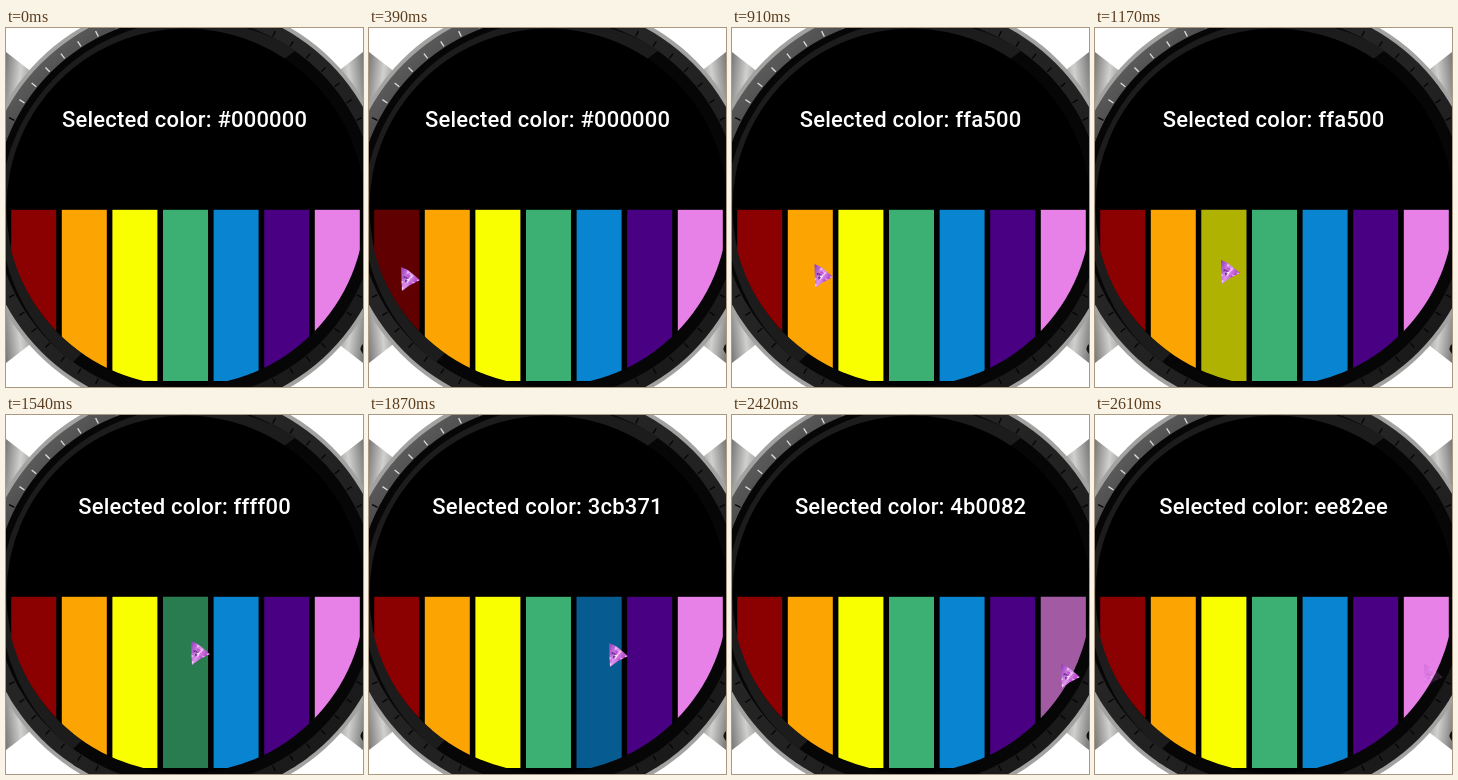
These frames come from a looping animation (357x359 px, 2.68 s). An HTML page:

```html
<!DOCTYPE html>
<html lang="en">
<head>
<meta charset="utf-8">
<title>Watch color picker</title>
<style>
  html, body { margin: 0; width: 100%; height: 100%; overflow: hidden; background: #fff; }
  svg { display: block; width: 357px; height: 359px; }
  #label {
    font: 500 22px Roboto, sans-serif; font-kerning: none; letter-spacing: .19px;
    fill: #fff; text-anchor: middle;
  }
</style>
</head>
<body>
<svg viewBox="0 0 357 359">
  <defs>
    <clipPath id="screen"><circle cx="179.5" cy="178.2" r="179.8"/></clipPath>
    <clipPath id="outline"><path d="M0 0L7 3L19 13L9 18L1 24Z"/></clipPath>
    <linearGradient id="steel" x2="1" y2=".3">
      <stop offset="0" stop-color="#777"/>
      <stop offset=".5" stop-color="#d0d0ce"/>
      <stop offset="1" stop-color="#8c8c8a"/>
    </linearGradient>
    <linearGradient id="bezel" x2="1" y2="1">
      <stop offset=".1" stop-color="#666"/>
      <stop offset=".35" stop-color="#262626"/>
      <stop offset="1" stop-color="#161616"/>
    </linearGradient>
    <linearGradient id="gem" x2="1" y2=".6">
      <stop offset="0" stop-color="#8e35b8"/>
      <stop offset=".5" stop-color="#dc92ea"/>
      <stop offset="1" stop-color="#a428b8"/>
    </linearGradient>
    <path id="lug" d="M0 24L31 48L12 80L0 98Z" fill="url(#steel)"/>
  </defs>

  <use href="#lug"/>
  <use href="#lug" transform="translate(357) scale(-1 1)"/>
  <use href="#lug" transform="translate(0 359) scale(1 -1)"/>
  <use href="#lug" transform="translate(357 359) scale(-1)"/>
  <g transform="translate(179.5 179.5)">
    <circle r="208" fill="#a2a2a0"/>
    <circle r="204" fill="url(#bezel)"/>
    <g id="ticks" stroke-width="1.3"></g>
    <circle r="191" fill="#060606"/>
    <path d="M-113 155A192 192 0 0 1 110 -157L98 -148A178 178 0 0 0 -103 145Z" fill="#1c1c1c"/>
    <circle r="179"/>
  </g>
  <path d="M357 316q-5 4 0 10Z" fill="#111"/>

  <g id="bars" clip-path="url(#screen)"></g>
  <text id="label" x="178.6" y="98.8"></text>
  <g id="cursor" clip-path="url(#outline)"><rect width="19" height="24" fill="url(#gem)"/></g>
</svg>

<script>
const LOOP = 2680, ENTER = 70, LEAVE = 2610, HOLD = 65;
const byId = id => document.getElementById(id);
const clamp = v => Math.min(1, Math.max(0, v));

function add(parent, tag, attrs) {
  const node = document.createElementNS('http://www.w3.org/2000/svg', tag);
  for (const name in attrs) node.setAttribute(name, attrs[name]);
  return byId(parent).appendChild(node);
}

let seed = 7;
const random = () => (seed = seed * 16807 % 2147483647) / 2147483647;

// each swatch is pressed at a moment and a point
const swatches = [
  { fill: '#8b0000', code: '8b0000', press: 390, x: 32, y: 239 },
  { fill: '#fca502', code: 'ffa500', press: 840, x: 81, y: 236 },
  { fill: '#faff00', code: 'ffff00', press: 1170, x: 126, y: 232 },
  { fill: '#3bb072', code: '3cb371', press: 1540, x: 185, y: 226 },
  { fill: '#0884d0', code: '884d0', press: 1870, x: 240, y: 228 },
  { fill: '#4a0082', code: '4b0082', press: 2100, x: 277, y: 227 },
  { fill: '#e780e7', code: 'ee82ee', press: 2420, x: 329, y: 249 }
];

for (let angle = 3; angle < 360; angle += 6) {
  add('ticks', 'path', {
    d: 'M0 -192V-198',
    transform: `rotate(${angle})`,
    stroke: angle > 300 ? '#ddd' : '#050505'
  });
}

swatches.forEach((swatch, i) => {
  const box = { x: 5.2 + i * 50.6, y: 181.8, width: 45, height: 171.2 };
  add('bars', 'rect', { ...box, fill: swatch.fill });
  swatch.shade = add('bars', 'rect', box);
});

// crystal facets
for (let i = 0; i < 26; i++) {
  const x = random() * 16, y = random() * 22;
  add('cursor', 'path', {
    d: `M${x} ${y}l${2 + random() * 3} ${random() * 2}l-3 ${1 + random() * 3}Z`,
    fill: ['#fff', '#f7d4fb', '#c24ad6', '#5d1a86'][i % 4],
    opacity: .8
  });
}

// the pointer leaves each swatch on release, faster every time
function pointerAt(t) {
  let x = 21, y = 215;
  swatches.forEach((swatch, i) => {
    const start = i ? swatches[i - 1].press + HOLD : ENTER;
    const travel = i ? 300 * .75 ** (i - 1) : 70;
    const k = clamp((t - start) / travel);
    x += (swatch.x - x) * k;
    y += (swatch.y - y) * k;
  });
  return [x, y];
}

function draw() {
  const t = performance.now() % LOOP;
  let color = '#000000';
  for (const { press, code, shade } of swatches) {
    const released = t >= press + HOLD;
    shade.setAttribute('opacity', t >= press && !released ? .3 : 0);
    if (released) color = code;
  }
  byId('label').textContent = 'Selected color: ' + color;
  byId('cursor').setAttribute('opacity', t < ENTER ? 0 : t < LEAVE ? 1 : .2);
  byId('cursor').setAttribute('transform', `translate(${pointerAt(t)})`);
  requestAnimationFrame(draw);
}
draw();
</script>
</body>
</html>
```
